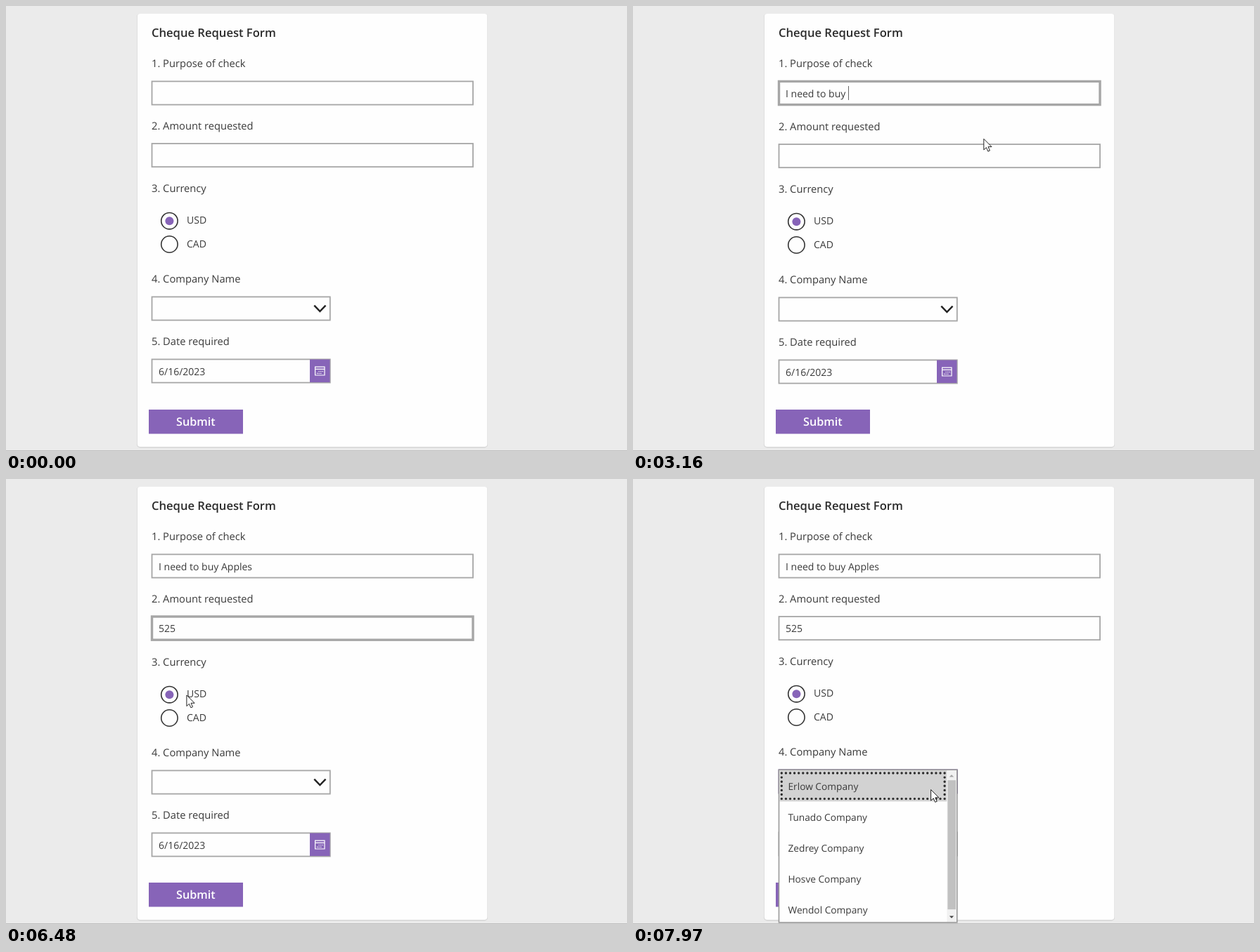
An HTML page that plays this animation: 883x634 px, repeating every 8000 ms.

```html
<!DOCTYPE html>
<html lang="en">
<head>
<meta charset="utf-8">
<title>Cheque Request Form</title>
<style>
  html, body { margin: 0; width: 100%; height: 100%; overflow: hidden; background: #ebebeb; }
  svg { display: block; }
  text {
    font: 14px "Open Sans", "Noto Sans", sans-serif; fill: #3a3a3a;
    white-space: pre; text-rendering: geometricPrecision;
  }
  .title { font-size: 16.6px; font-weight: 600; fill: #2b2b2b; }
  .label { font-size: 14.7px; }
  .item { font-size: 13.7px; }
  .submit { font-size: 16.2px; font-weight: 600; fill: #fff; text-anchor: middle; }
  .box { fill: #fefefe; stroke: #a6a6a6; stroke-width: 1.8; }
  .hover { stroke: #5d447f; }
  .focus { stroke-width: 3.4; }
  .radio { fill: #fefefe; stroke: #333; stroke-width: 1.6; }
  .purple { fill: #8764b8; }
  .caret { stroke: #666; stroke-width: 1; }
  .line { fill: none; stroke: #fff; stroke-width: 1.2; }
</style>
</head>
<body>
<svg width="883" height="634" viewBox="0 0 883 634">
  <rect width="883" height="634" fill="#ebebeb"/>
  <rect x="186" y="11" width="499" height="618.4" rx="4.5" fill="#d6d6d6"/>
  <rect x="186.8" y="11" width="497.6" height="617" rx="4" fill="#fefefe"/>
  <rect y="633" width="883" height="1" fill="#bdbdbd"/>

  <text class="title" x="207" y="44.3">Cheque Request Form</text>
  <text class="label" x="207" y="87">1. Purpose of check</text>
  <rect class="box" id="box1" x="207.5" y="107.4" width="456.5" height="33.2"/>
  <text id="text1" x="217" y="130"></text>
  <path class="caret" id="caret1"/>

  <g id="row2">
    <text class="label" x="207" y="175.8">2. Amount requested</text>
    <rect class="box" id="box2" x="207.5" y="196" width="456.5" height="33.2"/>
    <text id="text2" x="217" y="218.3"></text>
    <path class="caret" id="caret2"/>
  </g>

  <g id="rest">
    <text class="label" x="207" y="264.8">3. Currency</text>
    <circle class="radio" cx="232.4" cy="306.2" r="11.7"/>
    <circle class="purple" cx="232.4" cy="306.2" r="6"/>
    <text x="257" y="310.3">USD</text>
    <circle class="radio" cx="232.4" cy="339.5" r="11.7"/>
    <text x="257" y="343.7">CAD</text>

    <text class="label" x="207" y="394.2">4. Company Name</text>
    <rect class="box" id="box4" x="207.5" y="414.4" width="253.3" height="33.2"/>
    <path d="M438.3 426.6L446.4 435L454.5 426.6" fill="none" stroke="#222" stroke-width="2.4"/>

    <text class="label" x="207" y="483">5. Date required</text>
    <rect class="box" x="207.5" y="503.4" width="253.3" height="33.2"/>
    <text x="217" y="525.6">6/16/2023</text>
    <rect class="purple" x="432" y="503.5" width="28.5" height="32.6"/>
    <path class="line" d="M439.6 514.1H453V526H439.6ZM439.6 517.4H453"/>
    <path class="line" d="M444.5 520.5H451M442 523.3H448.5" stroke-dasharray="1.3 1.2"/>
  </g>

  <rect class="purple" x="203" y="575" width="134" height="34.5"/>
  <text class="submit" x="269.8" y="598.3">Submit</text>

  <g id="list">
    <rect x="207.5" y="414.4" width="253.3" height="217.4" fill="#fefefe" stroke="#999" stroke-width="1.6"/>
    <rect x="208.3" y="415.2" width="238" height="44.2" fill="#d2d2d2"/>
    <rect x="211.3" y="419" width="231.8" height="36.6" fill="none" stroke="#2b2b2b"
          stroke-width="3.4" stroke-linecap="round" stroke-dasharray="0 6.1"/>
    <rect x="446.4" y="415.2" width="13.6" height="215.8" fill="#f1f1f1"/>
    <rect x="447.4" y="429.2" width="11.6" height="184" fill="#c1c1c1"/>
    <path d="M449.8 424.6H456.2L453 421.2Z" fill="#a3a3a3"/>
    <path d="M449.8 622.4H456.2L453 625.8Z" fill="#444"/>
  </g>

  <circle id="click" r="12" fill="#fbf500" opacity=".55"/>
  <path id="arrow" d="M0 0V15.6L3.6 12.3L6 17.8L8.6 16.7L6.2 11.3H11.2Z" fill="#fff" stroke="#222" stroke-width="1"/>
  <path id="beam" d="M-4 -8H-1.2L0 -7.2L1.2 -8H4M0 -7.2V7.2M-4 8H-1.2L0 7.2L1.2 8H4" fill="none" stroke="#111" stroke-width="1.3"/>
</svg>
<script>
const LOOP = 8000, STEP = 70, BLINK = 530, HOVER_LAG = 100;
const $ = id => document.getElementById(id);
const show = (el, on) => el.style.display = on ? "" : "none";

// pointer hot spot: time, x, y
const path = [
  [70, 682, 446], [350, 560, 296], [560, 492, 202], [820, 467, 127.6],
  [2830, 467, 127.6], [3160, 498.8, 189.3], [4500, 498.8, 189.3], [4710, 503, 204],
  [5380, 503, 204], [5730, 478.6, 238.2], [6140, 330, 308], [6500, 236, 308],
  [6640, 236, 308], [6940, 296, 346], [7150, 358.5, 411.6], [7420, 440, 428],
  [7560, 440, 428], [7770, 436, 438], [7900, 436, 438], [7910, 430, 440],
  [7970, 423.6, 442.6]
];
const clicks = [710, 4710, 6500, 7490];
const focusAt = [0, 820, 4850], blurAt = 6570, openAt = 7560;

// evenly spaced key strokes: first, last, count
const strokes = groups => groups.flatMap(([a, b, n]) =>
  Array.from({ length: n }, (_, i) => a + (b - a) * i / Math.max(1, n - 1)));
const fields = [
  { n: 1, top: 106, caretY: 114, text: "I need to buy Apples",
    keys: strokes([[1500, 1500, 1], [1640, 2230, 6], [2370, 2560, 3], [2830, 3160, 4],
                   [3360, 3360, 1], [3570, 3690, 2], [3830, 3970, 3]]) },
  { n: 2, top: 196, caretY: 203, text: "525", keys: strokes([[5520, 5800, 3]]) }
];

const names = ["Erlow", "Tunado", "Zedrey", "Hosve", "Wendol"];
names.forEach((name, i) => {
  const item = document.createElementNS("http://www.w3.org/2000/svg", "text");
  item.setAttribute("class", "item");
  item.setAttribute("x", 220.5);
  item.setAttribute("y", 443 + 44.1 * i);
  item.textContent = name + " Company";
  $("list").append(item);
});

function pointer(t) {
  if (t < path[0][0]) return null;
  let i = path.length - 1;
  while (path[i][0] > t) i--;
  const [t0, x0, y0] = path[i], [t1, x1, y1] = path[i + 1] || [LOOP, x0, y0];
  const k = Math.floor((t - t0) / STEP) * STEP / (t1 - t0);
  return { x: x0 + (x1 - x0) * k, y: y0 + (y1 - y0) * k };
}

const inside = (p, top, right) =>
  !!p && p.x > 207 && p.x < right && p.y > top && p.y < top + 35;

function drawField(f, t, focus, past) {
  const typed = f.keys.filter(k => k <= t), label = $("text" + f.n);
  label.textContent = f.text.slice(0, typed.length);
  const box = $("box" + f.n).classList;
  box.toggle("focus", focus === f.n);
  box.toggle("hover", inside(past, f.top, 665));
  const last = Math.max(focusAt[f.n], ...typed);
  const x = Math.round(217 + label.getComputedTextLength()) + 0.5;
  $("caret" + f.n).setAttribute("d", `M${x} ${f.caretY}v20`);
  show($("caret" + f.n), focus === f.n && Math.floor((t - last) / BLINK) % 2 === 0);
}

function draw(t) {
  const focus = t >= blurAt ? 0 : t >= focusAt[2] ? 2 : t >= focusAt[1] ? 1 : 0;
  const now = pointer(t), past = pointer(t - HOVER_LAG);
  fields.forEach(f => drawField(f, t, focus, past));
  $("row2").setAttribute("transform", `translate(0 ${focus === 1 ? 1 : 0})`);
  $("rest").setAttribute("transform", `translate(0 ${focus ? 1 : 0})`);
  $("box4").classList.toggle("hover", inside(past, 414, 461));
  show($("list"), t >= openAt);

  const overText = fields.some(f => inside(now, f.top, 665));
  show($("beam"), overText);
  show($("arrow"), now && !overText);
  show($("click"), now && clicks.some(c => t >= c && t < c + 140));
  if (!now) return;
  for (const id of ["beam", "arrow"]) $(id).setAttribute("transform", `translate(${now.x} ${now.y})`);
  $("click").setAttribute("transform", `translate(${now.x - 1} ${now.y - 0.5})`);
}

const start = performance.now();
function frame() {
  draw((performance.now() - start) % LOOP);
  requestAnimationFrame(frame);
}
frame();
</script>
</body>
</html>
```
